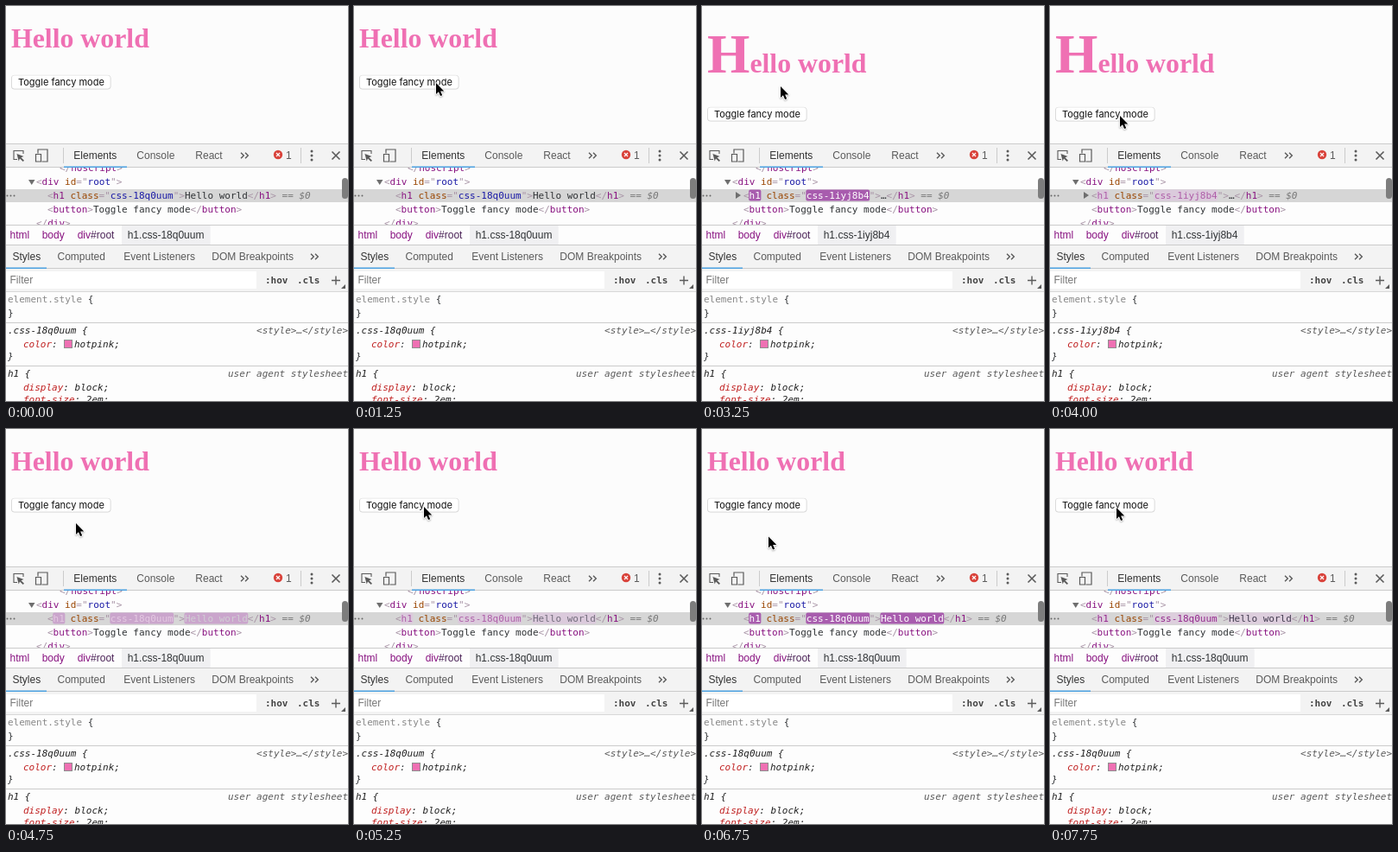
These frames come from a looping animation (396x457 px, 8 s). An HTML page with a canvas:

```html
<!DOCTYPE html>
<html lang="en">
<head>
<meta charset="utf-8">
<style>
html, body { margin: 0; width: 100%; height: 100%; overflow: hidden; background: #fcfcfc; }
canvas { display: block; }
</style>
</head>
<body>
<canvas id="stage" width="396" height="457"></canvas>
<script>
const ctx = document.getElementById('stage').getContext('2d');
const LOOP = 8000, STEP = 250, FLASH = 1400;
const SERIF = '"Liberation Serif", serif';
const SANS = '12px "Liberation Sans", sans-serif';
const MONO = '11px "DejaVu Sans Mono", monospace';
const ITALIC = 'italic ' + MONO;
const PINK = '#ef70b3', DARK = '#303336', GREY = '#5a5a5a', LINE = '#cbcbcb', BAR = '#f3f3f3';
const BRACKET = '#a894a6', TAG = '#881280', ATTR = '#994500', VALUE = '#1a1aa6', PROP = '#c02020';

// Heading toggles at these times, starting plain.
const toggles = [3250, 4500, 5750, 6750];

// Pointer tip: time, x, y
const path = [
  [250, 165, 220], [500, 147, 177], [750, 119, 127], [1000, 100, 97], [1250, 95, 89],
  [1500, 92.5, 94], [2500, 92.5, 94], [3250, 91, 93], [3500, 87, 103], [3750, 82, 123],
  [4000, 81, 127], [4500, 81, 127], [4750, 81, 109], [5000, 81, 92], [5250, 81, 90],
  [5750, 80, 91], [6000, 79, 109], [6250, 78, 122.5], [6750, 77, 124.5], [7000, 77, 119],
  [7250, 77, 103], [7500, 77, 93], [7750, 77, 91]
];

const mix = (a, b, p) => `rgb(${a.map((v, i) => Math.round(v + (b[i] - v) * p))})`;

function rect(x, y, w, h, fill, r = 0) {
  ctx.fillStyle = fill;
  ctx.beginPath();
  ctx.roundRect(x, y, w, h, r);
  ctx.fill();
}

function text(s, x, y, color, font, align = 'left') {
  ctx.font = font;
  ctx.fillStyle = color;
  ctx.textAlign = align;
  ctx.fillText(s, x, y);
  return x + ctx.measureText(s).width;
}

function poly(points, fill) {
  ctx.fillStyle = fill;
  ctx.beginPath();
  points.forEach(([x, y]) => ctx.lineTo(x, y));
  ctx.closePath();
  ctx.fill();
}

function stroke(d, color, width = 1) {
  ctx.strokeStyle = color;
  ctx.lineWidth = width;
  ctx.stroke(new Path2D(d));
}

function dot(x, y, r, fill) {
  ctx.fillStyle = fill;
  ctx.beginPath();
  ctx.arc(x, y, r, 0, Math.PI * 2);
  ctx.fill();
}

// Runs of [string, color, flash target color]; the box fades faster than the ink.
function code(runs, x, y, age = FLASH, font = MONO) {
  for (const [s, color, target] of runs) {
    let ink = color;
    if (target && age < FLASH) {
      ctx.font = font;
      rect(x - 0.5, y - 10, ctx.measureText(s).width + 1, 13,
        mix([222, 208, 222], [158, 72, 165], 0.85 * Math.exp(-age / 250)), 2);
      ink = mix([255, 255, 255], target, Math.min(1, age / 1100));
    }
    x = text(s, x, y, ink, font);
  }
  return x;
}

const chevrons = (x, y) =>
  stroke(`M${x} ${y - 3.3}l3.300 3.300l-3.300 3.300M${x + 5} ${y - 3.3}l3.300 3.300l-3.300 3.300`, GREY, 1.4);

function page(fancy) {
  rect(0, 0, 396, 159, '#fcfcfc');
  const base = fancy ? 77 : 48;
  const rest = text('H', 6, base, PINK, `bold ${fancy ? 63.5 : 31.8}px ${SERIF}`);
  text('ello world', rest, base, PINK, 'bold 31.8px ' + SERIF);
  const y = fancy ? 117 : 80;
  rect(6, y, 115.500, 16.500, '#d2d2d2', 4);
  rect(6.500, y - 0.3, 114.500, 16, '#e4e4e4', 3.5);
  rect(7, y + 0.5, 113.500, 15, '#fff', 3);
  text('Toggle fancy mode', 14, y + 12, '#111', '11px Inter, sans-serif');
}

function toolbar() {
  rect(0, 159, 396, 28, BAR);
  rect(0, 159, 396, 1, LINE);
  rect(0, 186, 396, 1, LINE);
  rect(67, 185.500, 73, 1.500, '#4aa0e0');
  stroke('M13 177.500H9V167.500H20V171', GREY, 1.1);
  poly([[12.500, 171], [20.500, 174], [17.500, 175.300], [21, 178.700], [19.700, 180], [16, 176.600], [14.700, 179.500]], GREY);
  stroke('M37 170.500V166H48V180H41.500', GREY, 1.2);
  stroke('M34.500 171.500H40.500V180H34.500Z', GREY, 1.2);
  rect(66, 164, 1, 18, LINE);
  text('Elements', 78.300, 177, '#333', SANS);
  text('Console', 151.300, 177, GREY, SANS);
  text('React', 219.300, 177, GREY, SANS);
  chevrons(272, 173);
  dot(315, 172, 5.2, '#d9433b');
  stroke('M313 170l4 4M317 170l-4 4', '#fff', 1.2);
  text('1', 324, 177, GREY, SANS);
  rect(341, 164, 1, 18, LINE);
  [168, 173, 178].forEach(y => dot(354, y, 1.5, GREY));
  stroke('M377.500 168.500l9 9M386.500 168.500l-9 9', GREY, 1.6);
}

function tree(name, fancy, age) {
  const purple = [136, 18, 128];
  const open = (tag, target) => [['<', BRACKET], [tag, TAG, target]];
  const close = tag => [['</', BRACKET], [tag, TAG], ['>', BRACKET]];
  const attr = (key, value, target) =>
    [[' ' + key, ATTR], ['="', BRACKET], [value, VALUE, target], ['">', BRACKET]];

  ctx.save();
  ctx.beginPath();
  ctx.rect(0, 187, 396, 66);
  ctx.clip();
  rect(0, 187, 396, 66, '#fdfdfd');
  rect(0, 212, 396, 15, '#d6d6d6');
  [1.500, 5.500, 9.500].forEach(x => dot(x, 219.500, 1, '#666'));
  code(close('noscript'), 62, 191);
  poly([[26, 201], [33.500, 201], [29.750, 207]], '#6e6e6e');
  code([...open('div'), ...attr('id', 'root')], 35, 207);
  if (fancy) poly([[39, 215], [45, 219], [39, 223]], '#6e6e6e');
  const body = fancy ? ['…', DARK] : ['Hello world', DARK, [48, 40, 62]];
  const end = code([...open('h1', purple), ...attr('class', name, purple), body, ...close('h1')], 48, 222.500, age);
  text(' == $0', end, 222.500, '#777', ITALIC);
  code([...open('button'), ['>', BRACKET], ['Toggle fancy mode', DARK], ...close('button')], 48, 239);
  code(close('div'), 35, 254.500);
  rect(389, 199, 7, 24, '#7d7d7d', 3.5);
  ctx.restore();
}

function crumbs(name) {
  const label = 'h1.' + name;
  rect(0, 253, 396, 24, '#fdfdfd');
  rect(0, 253, 396, 1, LINE);
  ctx.font = SANS;
  rect(134, 254, ctx.measureText(label).width + 14, 22, '#f0f0f2');
  text('html', 4.500, 269, TAG, SANS);
  text('body', 41.700, 269, TAG, SANS);
  text('#root', text('div', 82.700, 269, TAG, SANS), 269, '#4c2458', SANS);
  text(label, 140.700, 269, DARK, SANS);
}

function sidebar() {
  rect(0, 276, 396, 55, BAR);
  rect(0, 276, 396, 1, LINE);
  rect(0, 303, 396, 1, LINE);
  rect(0, 302.500, 47, 1.500, '#4aa0e0');
  text('Styles', 7.500, 294, '#333', SANS);
  text('Computed', 59.500, 294, GREY, SANS);
  text('Event Listeners', 136.300, 294, GREY, SANS);
  text('DOM Breakpoints', 238.300, 294, GREY, SANS);
  chevrons(353, 290);
  rect(0, 307, 290, 20, '#fff');
  text('Filter', 4.500, 321, '#777', SANS);
  text(':hov', 300, 321, '#444', 'bold ' + MONO);
  text('.cls', 337, 321, '#444', 'bold ' + MONO);
  stroke('M377 317.500H387M382 312.500V322.500', GREY, 1.4);
  poly([[393, 322], [393, 327], [388, 327]], GREY);
  rect(0, 330, 396, 1, '#d8d8d8');
}

function styles(name) {
  rect(0, 331, 396, 126, '#fdfdfd');
  code([['element.style', '#888'], [' {', DARK]], 2, 343);
  text('}', 2, 359, DARK, MONO);
  rect(0, 366, 396, 1, LINE);
  text(`.${name} {`, 2, 379, '#222', ITALIC);
  text('<style>…</style>', 396, 379, GREY, ITALIC, 'right');
  code([['color', PROP], [':', DARK]], 20, 395, FLASH, ITALIC);
  rect(67, 386, 10, 10, '#8e8e8e');
  rect(68, 387, 8, 8, PINK);
  text('hotpink;', 79, 395, '#222', ITALIC);
  text('}', 2, 409, DARK, ITALIC);
  rect(0, 416, 396, 1, LINE);
  text('h1 {', 2, 429, '#222', ITALIC);
  text('user agent stylesheet', 396, 429, GREY, ITALIC, 'right');
  code([['display', PROP], [': block;', '#222']], 20, 445, FLASH, ITALIC);
  code([['font-size', PROP], [': 2em;', '#222']], 20, 459, FLASH, ITALIC);
}

function pointer(t) {
  if (t < path[0][0]) return;
  const i = path.findLastIndex(k => k[0] <= t);
  const a = path[i], b = path[i + 1] || a;
  const p = b === a ? 0 : (t - a[0]) / (b[0] - a[0]);
  ctx.save();
  ctx.translate(a[1] + (b[1] - a[1]) * p, a[2] + (b[2] - a[2]) * p);
  ctx.scale(0.9, 0.9);
  const arrow = new Path2D('M0 0V14.500L3.300 11.400L5.600 16.800L8 15.800L5.700 10.500H10.300Z');
  ctx.shadowColor = 'rgba(0,0,0,.3)';
  ctx.shadowBlur = 2;
  ctx.shadowOffsetY = 1;
  ctx.strokeStyle = '#fff';
  ctx.lineWidth = 1.8;
  ctx.lineJoin = 'round';
  ctx.stroke(arrow);
  ctx.shadowColor = 'transparent';
  ctx.fillStyle = '#000';
  ctx.fill(arrow);
  ctx.restore();
}

function draw(now) {
  const t = Math.floor((now % LOOP) / STEP) * STEP;
  const done = toggles.filter(k => k <= t);
  const fancy = done.length % 2 === 1;
  const age = done.length ? t - done[done.length - 1] : FLASH;
  const name = fancy ? 'css-1iyj8b4' : 'css-18q0uum';
  page(fancy);
  toolbar();
  tree(name, fancy, age);
  crumbs(name);
  sidebar();
  styles(name);
  pointer(t);
}

const start = performance.now();
function tick() {
  draw(performance.now() - start);
  requestAnimationFrame(tick);
}
tick();
</script>
</body>
</html>
```
